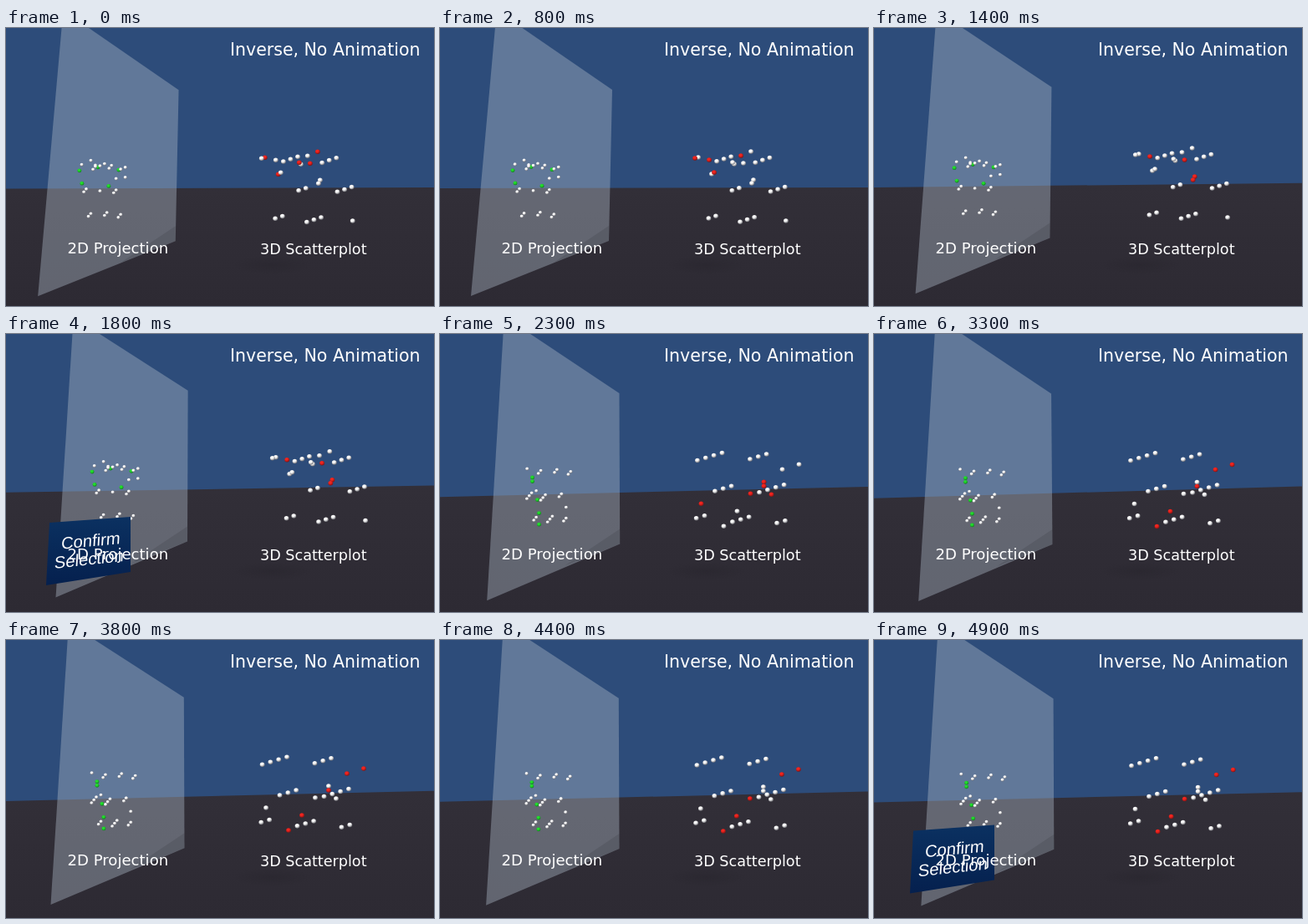
An HTML page for the animation above (5 s loop, 512x333 px).

```html
<!DOCTYPE html>
<html lang="en">
<head>
<meta charset="utf-8">
<title>Inverse, No Animation</title>
<style>
  html, body { margin: 0; height: 100%; overflow: hidden; background: #302d36; }
  svg { display: block; width: 100vw; height: 100vh; }
  text { fill: #fff; font-family: "DejaVu Sans", Verdana, sans-serif; }
  #button text { font: 20.2px "Liberation Sans", Arial, sans-serif; text-anchor: middle; }
</style>
</head>
<body>
<svg viewBox="0 0 512 333" preserveAspectRatio="none">
  <defs>
    <linearGradient id="floor" x2="0" y2="1">
      <stop stop-color="#322f38"/><stop offset="1" stop-color="#2d2a33"/>
    </linearGradient>
    <linearGradient id="blue" x2="0" y2="1">
      <stop stop-color="#0b3161"/><stop offset="1" stop-color="#05204e"/>
    </linearGradient>
    <radialGradient id="shade">
      <stop stop-color="#1d1b22" stop-opacity=".22"/><stop offset="1" stop-color="#1d1b22" stop-opacity="0"/>
    </radialGradient>
    <radialGradient id="white" cx=".4" cy=".32" r=".7">
      <stop offset=".4" stop-color="#f8f8f8"/><stop offset="1" stop-color="#6c6c72"/>
    </radialGradient>
    <radialGradient id="red" cx=".4" cy=".32" r=".7">
      <stop offset=".35" stop-color="#f0251f"/><stop offset="1" stop-color="#7c1113"/>
    </radialGradient>
    <radialGradient id="green" cx=".4" cy=".32" r=".7">
      <stop offset=".35" stop-color="#22dc2c"/><stop offset="1" stop-color="#0f7a1c"/>
    </radialGradient>
  </defs>
  <rect width="512" height="333" fill="#2d4c7a"/>
  <polygon id="ground" fill="url(#floor)"/>
  <ellipse cx="318" cy="284" rx="48" ry="11" fill="url(#shade)"/>
  <polygon id="panel" fill="#a9b5c4" fill-opacity=".42"/>
  <polygon id="wedge" fill="#302d36" fill-opacity=".18"/>
  <g id="dots"></g>
  <g id="button">
    <polygon points="52,226 149,219 149,285 48,301" fill="url(#blue)"/>
    <text transform="matrix(1 -.09 -.06 1 101 254.5)">Confirm</text>
    <text transform="matrix(1 -.11 -.06 1 99 276.5)">Selection</text>
  </g>
  <text x="268" y="33" font-size="20.5">Inverse, No Animation</text>
  <text x="73.5" y="270" font-size="18.1">2D Projection</text>
  <text x="304" y="271" font-size="17.6">3D Scatterplot</text>
</svg>
<script>
const $ = id => document.getElementById(id);

// camera drift: time, pan, tilt, roll
const path = [
  [0, .8, .2, .5], [800, 0, 0, 0], [1400, 8.5, -4, 4.5], [1800, 15, -7.3, 7.5],
  [2800, 14, -2, 15.5], [3800, 13, -6.9, 11.5], [4900, 14.6, -5.4, 11.5]
];

// keys: points that get selected, as plot x, y and depth; the first five are the green ones.
// box: extent of the other points; picks: start time and the red keys from then on.
const scenes = [{
  keys: [[322, 158, 109], [363, 162, 134], [375, 182, 90], [373, 186, 122], [352, 163, 87],
    [372, 148], [325, 175], [309, 155], [350, 161], [305, 156], [328, 173], [360, 153]],
  box: [316, 417, 136, 242, 87, 142], count: 17, project: y => .81 * y + 38.5,
  picks: [[0, 5, 6, 7, 8, 1], [400, 9, 0, 10, 11], [1100, 0, 1, 2, 3]],
  view: [0, 0, 0], confirm: 1700, shift: "0 0"
}, {
  keys: [[429, 159, 110], [409, 165, 110], [371, 194, 116], [355, 215, 118], [339, 233, 118],
    [387, 180], [387, 185], [396, 195], [312, 206]],
  box: [300, 416, 126, 238, 101, 156], count: 21, project: y => .76 * y + 54.8,
  picks: [[2200, 5, 6, 2, 7, 8], [3300, 0, 1, 6, 3, 4], [4300, 0, 1, 2, 3, 4]],
  view: [14, -2, 15.5], confirm: 4600, shift: "-5 2.5"
}];

// evenly scattered value between a and b
const scatter = (i, step, a, b) => a + (b - a) * ((.5 + i * step) % 1);

for (const s of scenes) {
  const [x0, x1, y0, y1, z0, z1] = s.box;
  s.points = s.keys.map(([x, y, z], i) => [x, y, z || scatter(i, .5498, z0, z1)]);
  for (let i = 1; i <= s.count; i++)
    s.points.push([scatter(i, .8192, x0, x1), scatter(i, .6711, y0, y1), scatter(i, .5498, z0, z1)]);
}

function cameraAt(t) {
  const i = Math.max(1, path.findIndex(p => p[0] >= t));
  const a = path[i - 1], b = path[i], u = (t - a[0]) / (b[0] - a[0]);
  return [1, 2, 3].map(k => a[k] + (b[k] - a[k]) * u);
}

const ball = (x, y, r, colour) =>
  `<ellipse cx="${x}" cy="${y}" rx="${r}" ry="${r * .95}" fill="url(#${colour})"/>`;

function draw(t) {
  const [pan, tilt, roll] = cameraAt(t);
  const s = scenes[t < 2200 ? 0 : 1];
  const red = s.picks.filter(p => p[0] <= t).pop().slice(1);

  // a corner moves with the camera, by its own share of pan and roll
  const corner = (x, y, px, rx, ry) => [x + px * pan + rx * roll, y + tilt + ry * roll];
  const right = corner(202, 255, 1.15, -.3, .1);
  const left = 66 + 1.3 * pan - .8 * roll;
  $("ground").setAttribute("points",
    [corner(0, 192, 0, 0, .68), corner(512, 191, 0, 0, -.3), [512, 333], [0, 333]]);
  $("panel").setAttribute("points", [[left, -1], [left + 31, -1],
    corner(206, 74, 1.1, -.65, .15), right, corner(37, 321, 1.8, -.6, .25)]);
  $("wedge").setAttribute("points",
    [[right[0], right[1] - 18], right, [right[0] - 66, right[1] + 26]]);

  const dx = pan - s.view[0], dy = tilt - s.view[1], turn = roll - s.view[2];
  let flat = "", plot = "";
  s.points.forEach(([x, y, z], i) => {
    const green = i < 5;
    flat += ball(z + 1.07 * dx, s.project(y) + dy + .25 * turn, green ? 2.5 : 2.1, green ? "green" : "white");
    plot += ball(x + dx + (x - 360) * dx * .0015, y + dy, 2.9, red.includes(i) ? "red" : "white");
  });
  $("dots").innerHTML = flat + plot;
  $("button").setAttribute("transform", `translate(${s.shift})`);
  $("button").setAttribute("visibility", t >= s.confirm && (t < 2200 || t >= 4600) ? "visible" : "hidden");
}

const start = performance.now();
let last = -1;
function tick() {
  // the picture advances in steps of 100 ms
  const t = Math.floor((performance.now() - start) % 5000 / 100) * 100;
  if (t !== last) draw(last = t);
  requestAnimationFrame(tick);
}
tick();
</script>
</body>
</html>
```
